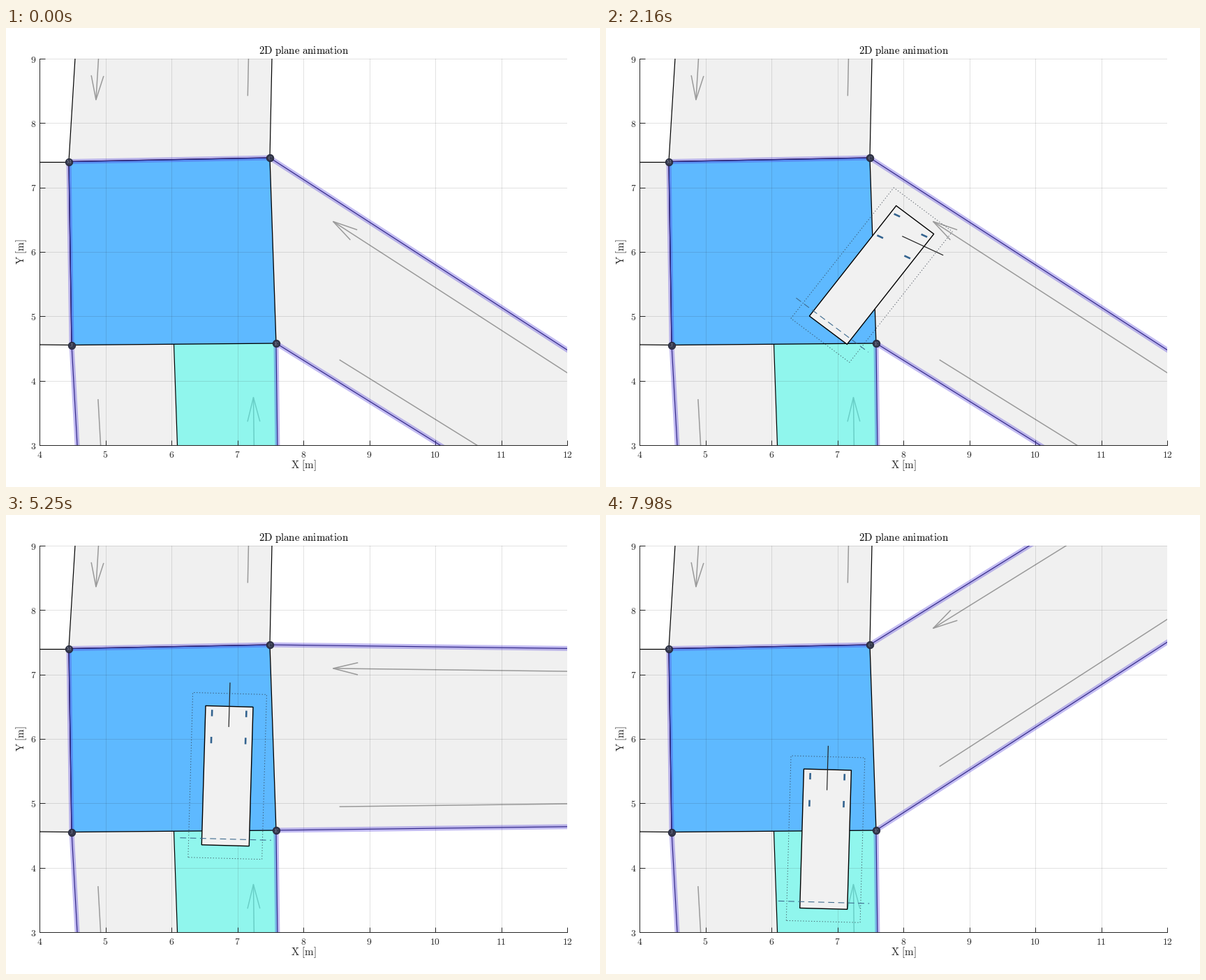
Animation, 851 px wide and 658 px high, one loop 8000 ms. Source, as a matplotlib script:

```python
import numpy as np
import matplotlib.pyplot as plt
from matplotlib.animation import FuncAnimation
from matplotlib.patches import Polygon

plt.rcParams["mathtext.fontset"] = "cm"
W, H, DPI = 851, 658, 100
PX = 72 / DPI  # one pixel in points
FRAMES, STEP = 320, 25
INK, ROAD, LANE = "#262626", "#f0f0f0", "#999999"

fig = plt.figure(figsize=(W / DPI, H / DPI), dpi=DPI, facecolor="white")
ax = fig.add_axes([48 / W, 60 / H, 756 / W, 554 / H])
ax.set(xlim=(4, 12), ylim=(3, 9))


def roman(text):
    return rf"$\mathrm{{{text}}}$".replace(" ", r"\ ")


def caption(x, y, text, size, **kw):
    fig.text(x / W, 1 - y / H, roman(text), fontsize=size * PX, ha="center", **kw)


def line(pts, color="black", width=1.2, z=3, **kw):
    art, = ax.plot(*np.transpose(pts), color=color, lw=width * PX, zorder=z,
                   solid_capstyle="butt", **kw)
    return art


def fill(pts, color, z=1, **kw):
    return ax.add_patch(Polygon(pts, closed=True, fc=color, zorder=z, **kw))


def glow(pts):
    return [line(pts, "#4a35d8", 7, 5, alpha=0.33, solid_joinstyle="round"),
            line(pts, "#32288a", 1.2, 6)]


def arrow(tail, tip):
    back = (tail - tip) / np.hypot(*(tail - tip))
    side = np.array([-back[1], back[0]])
    barbs = [tip + 0.375 * back + s * 0.094 * side for s in (1, -1)]
    return [line([tail, tip], LANE, 1.5, 1.1),
            line([barbs[0], tip, barbs[1]], LANE, 1.5, 1.1)]


def road(c_in, c_out, d_in, d_out, gap=0.96, lit=False):
    """Two-lane road leaving the junction side between two corners."""
    d_in, d_out = np.array(d_in), np.array(d_out)
    far = 6
    inset = 0.355 * np.rint((c_out - c_in) / 3)
    edges = [[c_in, c_in + far * d_in], [c_out, c_out + far * d_out]]
    lane_in, lane_out = c_in + inset, c_out - inset
    arts = [fill([*edges[0], *edges[1][::-1]], ROAD),
            line([lane_out + gap * d_out, lane_out + far * d_out], LANE, 1.5, 1.1)]
    arts += arrow(lane_in + far * d_in, lane_in + gap * d_in)
    for edge in edges:
        arts += glow(edge) if lit else [line(edge)]
    return arts


# Junction
A, B, C, D = (np.array(p) for p in
              ((4.444, 7.402), (7.492, 7.462), (7.587, 4.581), (4.487, 4.554)))
EAST, SOUTH = (0.013, -1), (0.0545, -1)  # edges of the lower road
road(A, B, (0.0596, 1), (0.0206, 1))
road(C, D, EAST, SOUTH, 0.84, True)
road(D, A, (-1, 0.011), (-1, 0))

middle = (C + D) / 2
divider = [middle, middle + np.add(EAST, SOUTH)]
fill([C, *divider, C + 2 * np.array(EAST)], "#41fbec", 1.2, alpha=0.55)
line(divider)
fill([A, B, C, D], "#5eb9ff", 1.3)
line([A, B, C, D, A], width=1.3)
glow([D, A, B])
for corner, name in zip((A, B, C, D), "MCEJ"):
    ax.plot(*corner, "o", ms=10.4 * PX, mfc="#34384c", mec="#1c1f30", mew=0.6, zorder=7)
    ax.text(*corner, roman(name), fontsize=7 * PX, color="#8f93a8",
            ha="center", va="center", zorder=8)

# Right-hand road, one slope per run
roads = [road(B, C, (1, m - 0.0128), (1, m + 0.0128), lit=True)
         for m in (-0.649, 0, 0.649)]

# Axes
ax.set_axisbelow("line")
ax.grid(color=INK, alpha=0.13, lw=PX)
ax.spines[["top", "right"]].set_visible(False)
for axis, pad in ((ax.xaxis, 5), (ax.yaxis, 3.2)):
    axis.set_major_locator(plt.MultipleLocator(1))
    axis.set_major_formatter(lambda v, _: roman(f"{v:.0f}"))
    axis.set_tick_params(direction="in", length=7.5 * PX, width=PX, pad=pad,
                         color=INK, labelcolor=INK, labelsize=13.6 * PX)
for side in ("left", "bottom"):
    ax.spines[side].set(color=INK, linewidth=PX)
caption(426.5, 36.5, "2D plane animation", 14.9, va="baseline")
caption(426.5, 627.5, "X [m]", 15, va="center", color=INK)
caption(22.5, 320.5, "Y [m]", 15, va="center", color=INK, rotation=90)

# Vehicle, in metres from the rear axle
BASE, REAR, NOSE, HALF, GAP = 1.74, -0.1, 2.06, 0.36, 0.2


def rect(x0, x1, h):
    return np.array([(x0, h), (x1, h), (x1, -h), (x0, -h), (x0, h)])


BODY = rect(REAR, NOSE, HALF)
MARGIN = rect(REAR - GAP, NOSE + GAP, HALF + GAP)
AXLE = np.array([(0, 0.69), (0, -0.69)])
WHEEL = np.array([(-0.05, 0), (0.05, 0)])
POINTER = np.array([(0, 0), (0.69, 0)])
HUBS = [(BASE + dx, dy) for dx in (0.21, -0.21) for dy in (0.26, -0.26)]

body = fill(BODY, "#f1f1f1", 9, ec="black", lw=1.4 * PX)
margin = line(MARGIN, "#2b3340", 1, 10, alpha=0.75, ls=(0, (1.3, 2.6)))
axle = line(AXLE, "#3d6a8e", 1.1, 10, ls=(0, (8, 5)))
wheels = [line(WHEEL, "#33638f", 2.6, 11) for _ in HUBS]
pointer = line(POINTER, "#222222", 1.2, 12)

DT = 0.005
CLOCK = np.arange(0, 3.8, DT)
START = np.array([6.711, 0.5165])


def ramp(t0, t1):
    return np.clip((CLOCK - t0) / (t1 - t0), 0, 1)


def smooth(u):
    return u * u * (3 - 2 * u)


def drive(bump, leave, turn0, turn1, end, power):
    """Approach, slow down, turn and speed off; gives x, y, heading, steering."""
    v = (2.946 - 1.863 * smooth(ramp(0.86, 1.53))
         + bump * np.sin(np.pi * ramp(1.5, 2.9)) ** 2
         + 13.54 * smooth(ramp(leave, leave + 0.4)))
    turn = 1 - (1 - ramp(turn0, turn1)) ** power
    a = np.radians(88.4 + (end - 88.4) * turn)
    n = 25
    a = np.convolve(np.pad(a, n // 2, mode="edge"), np.ones(n) / n, "valid")
    step = DT * v[:, None] * np.column_stack([np.cos(a), np.sin(a)])
    pos = START + np.cumsum(step, axis=0) - step[0]
    steer = np.arctan2(np.gradient(a, DT) * BASE, v)
    return np.column_stack([pos, a, steer])


sharp = drive(-0.596, 3.22, 1.69, 3.51, -33.4, 1.2)
square = drive(0.217, 2.79, 1.74, 2.90, -0.85, 1)
# Scene start, clock offset, track
RUNS = [(0, 0, sharp), (3.66, 3.672, square), (6.96, 6.97, square)]


def rot(a):
    c, s = np.cos(a), np.sin(a)
    return np.array([[c, s], [-s, c]])


def update(i):
    t = i * STEP / 1000
    k = sum(t >= run[0] for run in RUNS) - 1
    for n, group in enumerate(roads):
        for art in group:
            art.set_visible(n == k)
    _, offset, track = RUNS[k]
    x, y, a, steer = (np.interp(t - offset, CLOCK, col) for col in track.T)

    def place(pts):
        return pts @ rot(a) + (x, y)

    body.set_xy(place(BODY))
    margin.set_data(*place(MARGIN).T)
    axle.set_data(*place(AXLE).T)
    for art, hub in zip(wheels, HUBS):
        art.set_data(*place(WHEEL @ rot(steer) + hub).T)
    pointer.set_data(*place(POINTER @ rot(steer) + (BASE, 0)).T)
    return []


anim = FuncAnimation(fig, update, frames=FRAMES, interval=STEP, repeat=True,
                     repeat_delay=0, blit=False)
plt.show()
```
